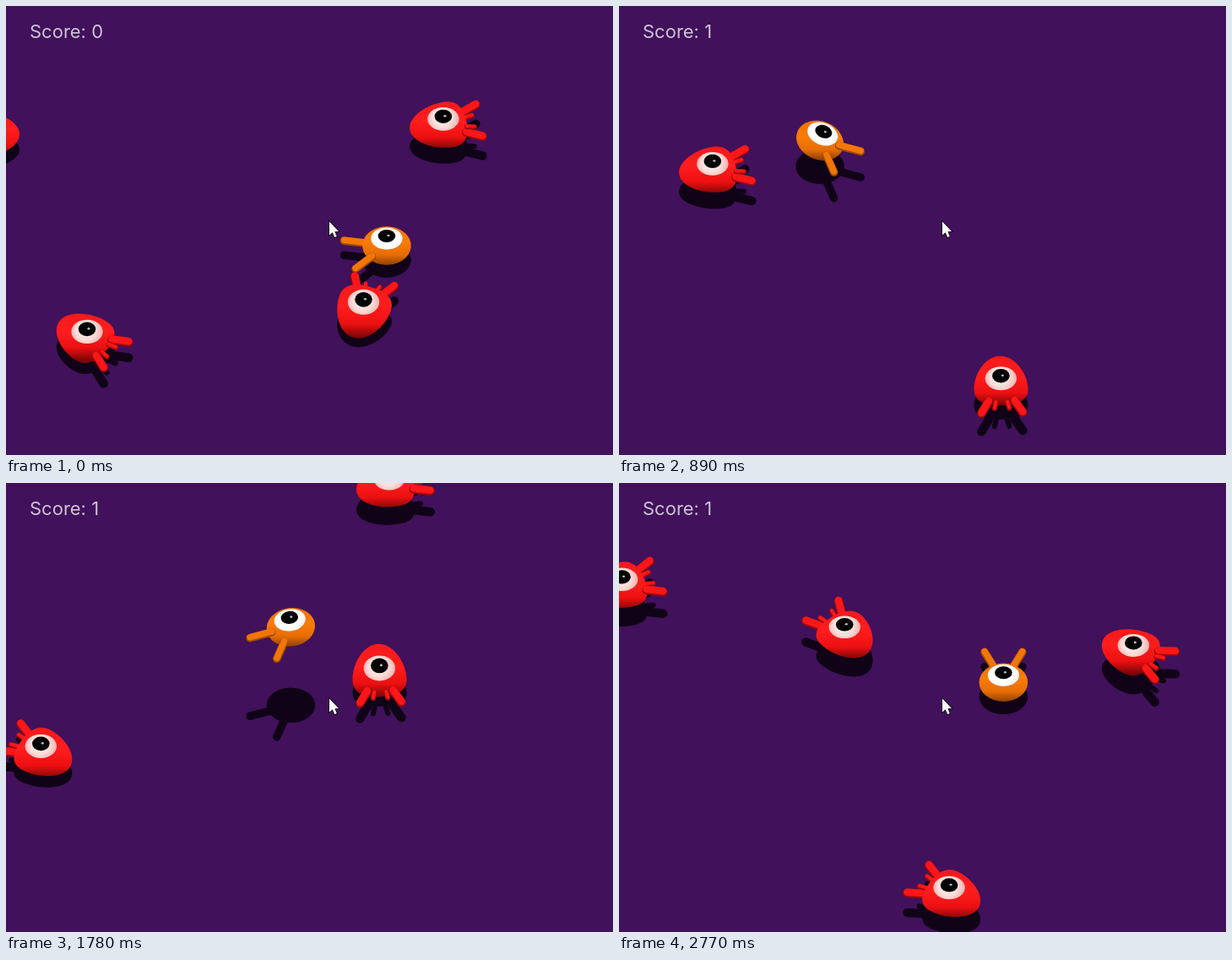
An HTML page with a canvas that plays this animation: 719 by 532 pixels, repeating every 2.79 s.

```html
<!DOCTYPE html>
<html lang="en">
<head>
<meta charset="utf-8">
<title>Creature chase</title>
<style>
  html, body { margin: 0; width: 100%; height: 100%; overflow: hidden; background: #41115b; }
  canvas { display: block; }
</style>
</head>
<body>
<canvas id="stage" width="719" height="532"></canvas>
<script>
const ctx = document.getElementById('stage').getContext('2d');
const LOOP = 2790, HIT = 870, RAD = Math.PI / 180, TILT = .78, SHADOW = '#100317';

const skins = {
  mob: { body: ['#f51a1c', '#ff1d1d', '#ec1012', '#7c0505'], limb: '#fb1618', dark: '#a00a0c',
         eye: ['#fff0ec', '#ffdcd8', '#efb4b0'] },
  player: { body: ['#ee7204', '#f97c07', '#e66d03', '#8c3f02'], limb: '#f27604', dark: '#a04a03',
            eye: ['#ffffff', '#ffffff', '#f4f0f2'] }
};

// Each mob walks straight: seen at a time and place, speed in px/s, phase of its bob
const mobs = [
  { at: 0, x: -19, y: 152, vx: 298, vy: 0, phase: 520, end: HIT },
  { at: 0, x: 513, y: 142, vx: -460, vy: 60, phase: 700 },
  { at: 0, x: 422, y: 362, vx: -114, vy: 280, phase: 450 },
  { at: 0, x: 92, y: 391, vx: -350, vy: -205, phase: 350 },
  { at: 1130, x: 449, y: 374, vx: -13, vy: -289, phase: 230 },
  { at: 2050, x: 170, y: 381, vx: 313, vy: 150, phase: 250 },
  { at: 2050, x: 289, y: 46, vx: -403, vy: 107, phase: 880 },
  { at: 2410, x: 167, y: 78, vx: 287, vy: 287, phase: 850 },
  { at: 2770, x: 605, y: 198, vx: -389, vy: -172, phase: 100 }
];

// Directions the player is steered in: time, right, down
const moves = [[-38, 1, 0], [103, -1, 0], [346, -1, -1], [865, 0, 0], [965, -1, 1],
  [1180, 1, 1], [1387, 1, 0], [1573, 1, -1], [2050, 0, -1], [2286, 0, 1]];
const SPEED = .42, TURN = .72;

// Jump, bounce, jump: time of the top and height
const jumps = [[637, 81], [1085, 58], [1723, 81]];

const jumpHeight = t => Math.max(0, ...jumps.map(([top, h]) => h - ((t - top) / 30) ** 2));

function mobAt(m, t) {
  const s = (t - m.at) / 1000, bob = Math.cos((t - m.phase) / 900 * 2 * Math.PI);
  const face = Math.atan2(m.vy / TILT, m.vx);
  return {
    x: m.x + m.vx * s, y: m.y + m.vy * s, drop: 22 + 4.5 * bob, face, roll: 0,
    squash: .85 - .08 * bob * Math.sin(face) ** 2, limbs: mobLimbs, skin: skins.mob
  };
}

function playerAt(t) {
  let x = 435, ground = 301, heading = -45;
  moves.forEach(([from, dx, dy], i) => {
    const dt = Math.min(t, i + 1 < moves.length ? moves[i + 1][0] : LOOP) - from;
    const size = Math.hypot(dx, dy);
    if (dt <= 0 || !size) return;
    x += dx / size * SPEED * dt;
    ground += dy / size * SPEED * dt * .72;
    const target = Math.atan2(dy, dx) / RAD;
    const turn = 180 - (3780 - target + heading) % 360;
    heading += Math.sign(turn) * Math.min(Math.abs(turn), TURN * dt);
  });
  const face = heading * RAD, drop = 17 + jumpHeight(t);
  const rise = jumpHeight(t + 1) - jumpHeight(t);
  return {
    x, y: ground - drop, drop, face, roll: -70 * RAD * rise * Math.cos(face),
    squash: .79, round: true, limbs: playerLimbs, skin: skins.player
  };
}

// Limbs: angle from the back, inner radius, outer radius, width
const pair = (spread, ...rest) => [[-spread, ...rest], [spread, ...rest]];
const mobLimbs = [...pair(27, 34, 54, 10.5), ...pair(12, 33, 42, 6)];
const playerLimbs = pair(26, 24, 51, 9.5);

function ellipse(x, y, rx, ry, fill) {
  ctx.beginPath();
  ctx.ellipse(x, y, rx, ry, 0, 0, 7);
  ctx.fillStyle = fill;
  ctx.fill();
}

function line(x1, y1, x2, y2, width, color) {
  ctx.beginPath();
  ctx.moveTo(x1, y1);
  ctx.lineTo(x2, y2);
  ctx.lineWidth = width;
  ctx.strokeStyle = color;
  ctx.stroke();
}

function drawLimbs(c, shown, y = c.y, flat) {
  for (const [spread, r0, r1, width] of c.limbs) {
    const a = c.face + Math.PI + spread * RAD, dx = Math.cos(a), dy = Math.sin(a) * TILT;
    if (!shown(dy)) continue;
    const ends = [c.x + dx * r0, y + dy * r0, c.x + dx * r1, y + dy * r1];
    line(...ends, width, flat || c.skin.dark);
    if (flat) continue;
    ends[1] -= 1; ends[3] -= 1;
    line(...ends, width - 2, c.skin.limb);
  }
}

function bodyPath(c, y, squash, roll) {
  ctx.save();
  ctx.translate(c.x, y);
  ctx.rotate(roll);
  ctx.scale(1, squash);
  ctx.rotate(c.face);
  ctx.beginPath();
  if (c.round) ctx.arc(0, 0, 28.8, 0, 7);
  else {
    ctx.moveTo(35, 0);
    for (const side of [1, -1]) {
      const back = [[35, 18, 10, 32, -11, 32], [-26, 32, -33, 21, -33, 0]];
      const curves = side > 0 ? back : [[-33, 21, -26, 32, -11, 32], [10, 32, 35, 18, 35, 0]];
      curves.forEach(([a, b, d, e, f, g]) => ctx.bezierCurveTo(a, b * side, d, e * side, f, g * side));
    }
  }
  ctx.restore();
}

function drawShadow(c) {
  const y = c.y + c.drop;
  drawLimbs(c, () => true, y, SHADOW);
  bodyPath(c, y, .72, 0);
  ctx.fillStyle = SHADOW;
  ctx.fill();
}

function drawBody(c) {
  drawLimbs(c, dy => dy <= 0);
  const half = (c.round ? 29 : 33) * c.squash;
  const shade = ctx.createLinearGradient(c.x, c.y - half, c.x, c.y + half);
  [0, .4, .74, 1].forEach((stop, i) => shade.addColorStop(stop, c.skin.body[i]));
  bodyPath(c, c.y, c.squash, c.roll);
  ctx.fillStyle = shade;
  ctx.fill();
  drawLimbs(c, dy => dy > 0);
}

function drawEye(c) {
  const back = c.round ? 0 : 5, ry = c.round ? 13 : 16.3 * c.squash;
  ctx.save();
  ctx.translate(c.x - Math.cos(c.face) * back, c.y - Math.sin(c.face) * back * TILT);
  ctx.rotate(c.roll);
  ctx.translate(0, c.round ? -8.5 : -7.5);
  const white = ctx.createRadialGradient(-3, -3, 4, 0, 0, 19);
  c.skin.eye.forEach((color, i) => white.addColorStop(i / 2, color));
  ellipse(0, 0, 18.7, ry, white);
  ellipse(0, -3, 10.3, c.round ? 7.5 : 9.6 * c.squash, '#030303');
  ellipse(2, -3.5, 1.6, 1.3, '#b9b9b9');
  ctx.restore();
}

function drawCursor() {
  ctx.beginPath();
  [[383, 255.5], [383, 271.5], [386.7, 268.2], [389.2, 274], [391.8, 273], [389.4, 267.3], [394, 267]]
    .forEach(p => ctx.lineTo(...p));
  ctx.closePath();
  ctx.lineWidth = 1.6;
  ctx.strokeStyle = '#0a0a0a';
  ctx.stroke();
  ctx.fillStyle = '#fff';
  ctx.fill();
}

function draw(t) {
  ctx.fillStyle = '#41115b';
  ctx.fillRect(0, 0, 719, 532);
  ctx.lineCap = 'round';
  const creatures = mobs.filter(m => t < (m.end || LOOP)).map(m => mobAt(m, t));
  creatures.push(playerAt(t));
  creatures.sort((a, b) => a.y + a.drop - b.y - b.drop);
  creatures.forEach(drawShadow);
  creatures.forEach(drawBody);
  creatures.forEach(drawEye);
  ctx.font = '22px Inter, sans-serif';
  ctx.fillStyle = '#cfc3d6';
  ctx.fillText('Score: ' + (t < HIT ? 0 : 1), 28, 38);
  drawCursor();
}

// The picture refreshes in even steps of about 125 ms between these beats
const beats = [0, 640, 1130, 1520, 2050, 2410, 2770, LOOP];
function stepped(t) {
  const i = beats.findIndex(b => b > t) - 1;
  const gap = beats[i + 1] - beats[i], step = gap / Math.max(1, Math.round(gap / 125));
  return beats[i] + Math.floor((t - beats[i]) / step) * step;
}

const start = performance.now();
function frame() {
  draw(stepped((performance.now() - start) % LOOP));
  requestAnimationFrame(frame);
}
frame();
</script>
</body>
</html>
```
